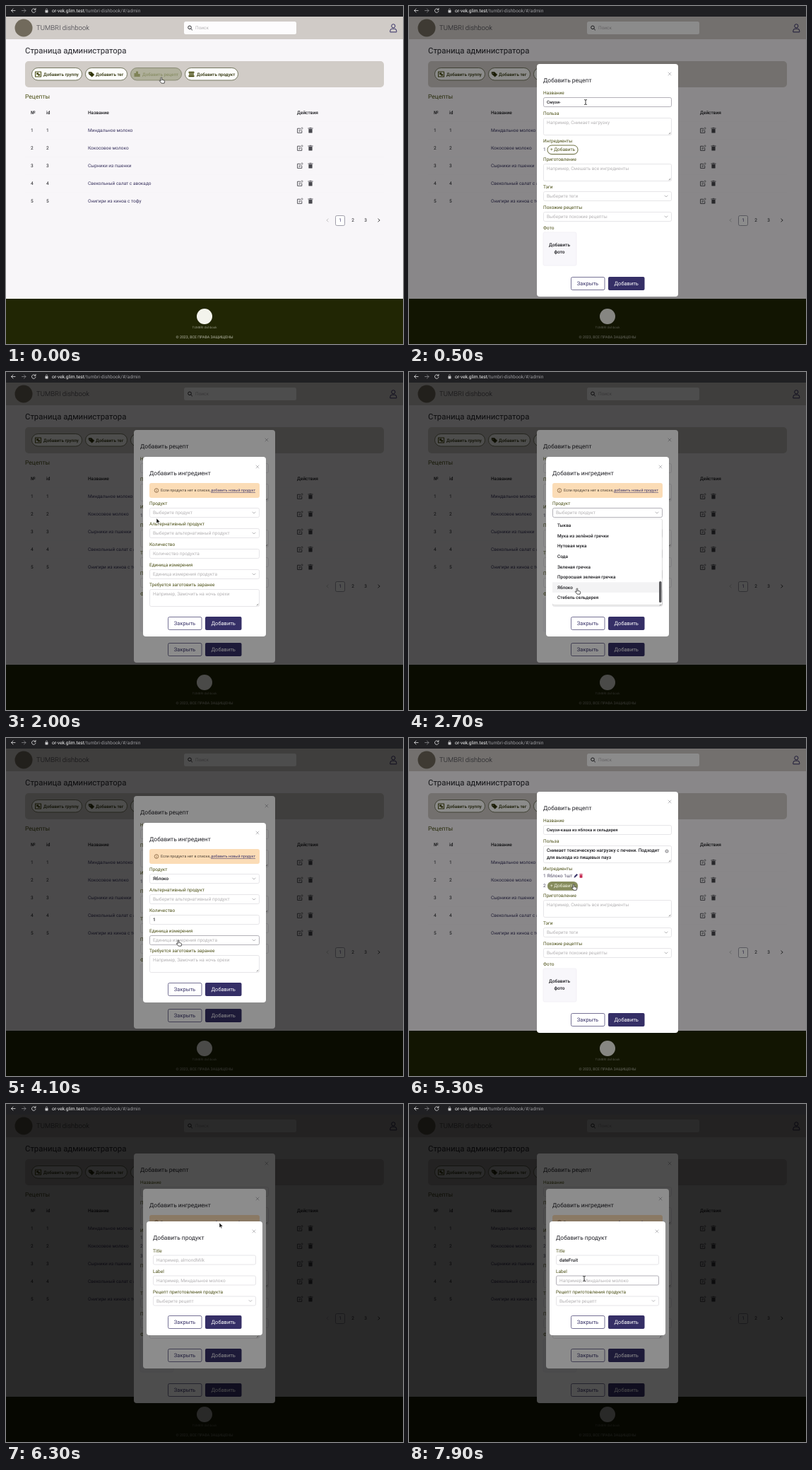
An HTML page for the animation above (8000 ms loop, 562 by 478 pixels).

```html
<!DOCTYPE html>
<html lang="ru">
<head>
<meta charset="utf-8">
<title>Страница администратора</title>
<style>
html, body { margin: 0; width: 100%; height: 100%; overflow: hidden; background: #f8f6f9; }
svg { display: block; }
#stage { width: 100vw; height: 100vh; font-family: Roboto, sans-serif; text-rendering: geometricPrecision; }
</style>
</head>
<body>
<svg id="stage" viewBox="0 0 562 478"></svg>
<script>
const LOOP = 8000, STEP = 100;
const OLIVE = '#4a4e14', NAVY = '#352f66', INK = '#1c1c20', HINT = '#b4b2b4', ICON = '#48484e';
const stage = document.getElementById('stage');

// Drawing helpers; text is placed by its vertical middle.
const text = (x, y, str, { size = 6.5, fill = INK, weight = 400, anchor = 'start', extra = '' } = {}) =>
  `<text x="${x}" y="${y + size * .35}" font-size="${size}" fill="${fill}" font-weight="${weight}" text-anchor="${anchor}" ${extra}>${str}</text>`;
const rect = (x, y, w, h, fill, r = 0, stroke = 'none') =>
  `<rect x="${x}" y="${y}" width="${w}" height="${h}" rx="${r}" fill="${fill}" stroke="${stroke}" stroke-width=".8"/>`;
const line = (d, stroke, width = .8, fill = 'none') =>
  `<path d="${d}" fill="${fill}" stroke="${stroke}" stroke-width="${width}" stroke-linecap="round" stroke-linejoin="round"/>`;
const circle = (x, y, r, fill, stroke = 'none') =>
  `<circle cx="${x}" cy="${y}" r="${r}" fill="${fill}" stroke="${stroke}"/>`;
const chevron = (x, y, dx, dy, color) => dx
  ? line(`M${x - dx} ${y - 2}L${x + dx} ${y}L${x - dx} ${y + 2}`, color)
  : line(`M${x - 2} ${y - dy}L${x} ${y + dy}L${x + 2} ${y - dy}`, color);

const trash = (x, y, color, k = 1) => `<g transform="translate(${x} ${y}) scale(${k})">` +
  rect(-2.6, -2, 5.2, 5.6, color, .6) + line('M-3.2-3h6.4M-1-3.7h2', color, .9) + '</g>';
const edit = (x, y) => line(`M${x} ${y - 2.8}h-3.4v6.2h6.2v-3`, ICON, .9) +
  line(`M${x - 1} ${y + 1}l.4-1.7 3.6-3.6 1.3 1.3-3.6 3.6z`, ICON, .7);

// Timing helpers.
const clamp = v => Math.max(0, Math.min(1, v));
const during = (t, a, b) => t >= a && t < b;
const ramp = (t, a, b) => clamp((t - a) / (b - a));
const typed = (str, t, a, b) => str.slice(0, Math.round(ramp(t, a, b) * str.length));
const show = (t, a, b) => !during(t, a, b) ? 0 : t < a + STEP ? .5 : 1;

function browserBar() {
  return rect(0, 0, 562, 15, '#202023') +
    line('M13 6.5H7.5M10 4L7.5 6.5L10 9', '#e2e2e4') +
    line('M22.5 6.5H28M25.5 4L28 6.5L25.5 9', '#88888c') +
    line('M41.6 5a2.8 2.8 0 1 0 .4 2.2M42 3.3v2h-2', '#e2e2e4') +
    rect(55.5, 6, 4, 3.4, '#c8c8ca', .4) + line('M56.4 6V5a1.1 1.1 0 0 1 2.2 0V6', '#c8c8ca', .6) +
    text(65, 6.5, 'or-vek.glim.test<tspan fill="#98989c">/tumbri-dishbook/#/admin</tspan>', { fill: '#f2f2f2', size: 6.7 });
}

const buttonIcons = [
  x => line(`M${x} 93h8v7h-8z`, OLIVE, 1.1) + rect(x + 1.6, 94.4, 3, 2.6, OLIVE) + rect(x + 3.8, 96.2, 2.8, 2.4, OLIVE),
  x => line(`M${x} 93.5h3.4l3.8 3.6-3 3-4.2-3.8z`, '#2c3006', .8, '#2c3006') + circle(x + 1.6, 95, .6, '#fff'),
  x => rect(x, 95, 3, 5, '#7f8357') + rect(x + 2.5, 92.5, 3, 7.5, '#7f8357') + rect(x + 5.2, 96, 3, 4, '#7f8357'),
  x => rect(x, 92.8, 8, 2, OLIVE, .6) + rect(x + .6, 95.4, 6.8, 2, OLIVE) + rect(x, 98, 8, 2.2, OLIVE, .6)
];

function toolButton(i, x, w, label, hover) {
  const color = hover ? '#8b9068' : '#2c3006';
  return rect(x + .5, 87.5, w, 17.5, hover ? '#b0b09c' : '#fdfdfb', 8.7, hover ? '#7c7e66' : '#5a5e42') +
    buttonIcons[i](x + 5.5) + text(x + (i === 1 ? 15 : 17), 96.5, label, { fill: color, weight: 500, size: 6.25 });
}

const dishes = ['Миндальное молоко', 'Кокосовое молоко', 'Сырники из пшенки', 'Свекольный салат с авокадо', 'Онигири из киноа с тофу'];

function page(t) {
  const bold = { weight: 500 };
  let s = rect(0, 14, 562, 464, '#f8f6f9') + rect(0, 14, 562, 33, '#d0cbc7') +
    circle(25, 31, 12.5, '#716a5c') +
    text(43, 31, 'TUMBRI dishbook', { size: 9.5, weight: 300, fill: '#34343c' }) +
    rect(252, 22, 159, 18, '#fdfcfd', 2.5) + circle(260, 30.3, 2.3, 'none', '#2c2c30') +
    line('M261.8 32.2l1.8 1.8', '#2c2c30', 1) + text(268, 31, 'Поиск', { fill: HINT }) +
    circle(548.3, 28.3, 2.6, 'none', NAVY) + line('M543.8 36.5v-1.3a3 3 0 0 1 3-3h3a3 3 0 0 1 3 3v1.3z', NAVY, 1) +
    text(27, 62.7, 'Страница администратора', { size: 11.35, fill: '#222228' }) +
    rect(27, 78, 508, 37, '#d1ccc7', 5) +
    toolButton(0, 36, 71, 'Добавить группу') + toolButton(1, 112, 59, 'Добавить тег') +
    toolButton(2, 176, 72, 'Добавить рецепт', t < 200) + toolButton(3, 253, 75, 'Добавить продукт') +
    text(27, 128.5, 'Рецепты', { size: 8.55, fill: OLIVE }) +
    text(35, 151, '№', bold) + text(57, 151, 'id', bold) +
    text(116, 151, 'Название', bold) + text(412, 151, 'Действия', bold);
  dishes.forEach((name, i) => {
    const y = 176 + i * 25;
    s += rect(27, y - 13, 508, .5, '#f2f0f4') + text(35, y, i + 1) + text(57, y, i + 1) +
      text(116, y, name, { fill: '#3b3560' }) + edit(416, y) + trash(431, y, ICON);
  });
  s += chevron(455, 303, -1.2, 0, '#bbb') + rect(466.5, 296.5, 13, 14, '#fff', 2, '#8a8896');
  [473, 491, 509].forEach((x, i) => s += text(x, 303, i + 1, { anchor: 'middle', fill: i ? INK : NAVY }));
  return s + chevron(528, 303, 1.2, 0, '#222') +
    rect(0, 414, 562, 64, '#212604') + circle(281, 439, 11, '#f3f3ec') +
    text(281, 454.5, 'TUMBRI dishbook', { size: 4.4, fill: '#8d907b', anchor: 'middle' }) +
    text(281, 468.5, '© 2023, ВСЕ ПРАВА ЗАЩИЩЕНЫ', { size: 5.3, fill: '#b5b6a6', anchor: 'middle' });
}

// Form parts.
function modal(x, y, w, h, title, body) {
  const cx = x + w - 12, cy = y + 14;
  return rect(x, y, w, h, '#fff', 4) + line(`M${cx - 2} ${cy - 2}l4 4m0-4l-4 4`, '#a2a2a6', .7) +
    text(x + 9, y + 23, title, { size: 8.45, fill: '#222228' }) + body +
    rect(229.5, y + h - 27.5, 47.5, 18, '#fff', 2, '#55507c') +
    text(253, y + h - 18.5, 'Закрыть', { size: 7.5, fill: NAVY, anchor: 'middle' }) +
    rect(282, y + h - 28, 51.5, 19, NAVY, 2) +
    text(307.7, y + h - 18.5, 'Добавить', { size: 7.5, fill: '#fff', anchor: 'middle' });
}

function field(x, y, w, label, value, hint, { h = 14, focus, select, size = 6.5 } = {}) {
  const style = value ? { weight: 500, size } : { fill: HINT };
  let s = text(x, y - 6, label, { fill: OLIVE }) +
    rect(x + .5, y + .5, w - 1, h - 1, '#fff', 2, focus ? '#a09ea6' : '#e0dfe3');
  (value || hint).split('\n').forEach((row, i) => s += text(x + 5, y + 7 + i * 10, row, style));
  if (select) s += chevron(x + w - 8, y + 7, 0, 1, '#a5a5a8');
  if (h > 14) s += line(`M${x + w - 4} ${y + h - 2}l2-2m-.6 2l.6-.6`, '#666', .6);
  return s;
}

function dropdown(y, items, h, scroll, hover) {
  const pitch = 14.6, hidden = Math.max(0, items.length - 8);
  let s = rect(203, y - .5, 156, h + 2, '#0002', 3) +
    `<svg x="203" y="${y}" width="155" height="${h}">` + rect(0, 0, 155, h, '#fff', 2);
  items.forEach((name, i) => {
    const cy = 9 + (i - hidden * scroll) * pitch;
    if (i === hover) s += rect(0, cy - 7.3, 155, pitch, '#f3f3f4');
    s += text(7, cy, name, { weight: 500, size: 6.4 });
  });
  if (hidden) s += rect(151, 2 + scroll * 86, 3.5, 30, '#58585b', 1.5);
  return s + '</svg>';
}

function recipeForm(t) {
  const rows = t >= 5700 ? 2 : t >= 4800 ? 1 : 0;
  const top = 82 - rows * 6, low = top + rows * 12, rowY = low + 121;
  const hover = during(t, 1700, 2000) || during(t, 5200, 5500) || during(t, 5800, 6000);
  const name = typed('Смузи-каша из яблока и сельдерея', t, 400, 900);
  const benefit = typed('Снимает токсическую нагрузку с печени. Подходит\nдля выхода из пищевых пауз', t, 1000, 1500);
  let s = field(190, top + 47, 182, 'Название', name, 'Например, Миндальное молоко', { size: 6, focus: during(t, 400, 1000) }) +
    field(190, top + 76, 182, 'Польза', benefit, 'Например, Снимает нагрузку', { h: 25, size: 6.55, focus: during(t, 1000, 2000) });
  if (benefit) s += circle(365, top + 84, 2.6, '#a5a5a8') + line(`M364 ${top + 83}l2 2m0-2l-2 2`, '#fff', .6);
  s += text(190, top + 109, 'Ингредиенты', { fill: OLIVE });
  ['Яблоко 1шт', 'Стебель сельдерея 1шт'].slice(0, rows).forEach((item, i) => {
    const y = top + 119 + i * 12, x = 236 + i * 38;
    s += text(190, y, `${i + 1} ${item}`, { fill: '#4a4560' }) +
      line(`M${x - 2} ${y + 2}l.5-1.7 3-3 1.2 1.2-3 3z`, NAVY, .6, NAVY) + trash(x + 7.5, y, '#c52b52', .75);
  });
  s += text(190, rowY, rows + 1, { fill: '#4a4560' }) +
    rect(196, rowY - 5.5, 43.5, 13, '#0002', 6) +
    rect(196, rowY - 6, 43, 12.5, hover ? '#868c5d' : '#fff', 6, hover ? 'none' : OLIVE) +
    text(217.5, rowY, '+ Добавить', { fill: hover ? '#f4f5e6' : OLIVE, anchor: 'middle' }) +
    field(190, low + 141, 182, 'Приготовление', '', 'Например, Смешать все ингредиенты', { h: 25 }) +
    field(190, low + 180, 182, 'Тэги', '', 'Выберите теги', { select: true }) +
    field(190, low + 209, 182, 'Похожие рецепты', '', 'Выберите похожие рецепты', { select: true }) +
    text(190, low + 232, 'Фото', { fill: OLIVE }) + rect(190, low + 238, 47, 47, '#f8f7fb', 2, '#f0eef4') +
    text(213, low + 256, 'Добавить', { anchor: 'middle', weight: 500 }) +
    text(213, low + 266, 'фото', { anchor: 'middle', weight: 500 });
  return modal(181, top, 200, 329 + rows * 12, 'Добавить рецепт', s);
}

const products = ['Миндаль', 'Вода', 'Финики', 'Кокос', 'Пшено', 'Свекла', 'Авокадо', 'Киноа', 'Тофу', 'Нори', 'Рис', 'Банан',
  'Лимон', 'Соль', 'Мёд', 'Корица', 'Тыква', 'Мука из зелёной гречки', 'Нутовая мука', 'Сода', 'Зеленая гречка',
  'Проросшая зеленая гречка', 'Яблоко', 'Стебель сельдерея'];
const units = ['шт', 'г', 'кг', 'мл', 'л', 'ст. л.', 'ч. л.', 'стакан'];

function ingredientForm(t) {
  const second = during(t, 5500, 5700), first = during(t, 2800, 4800);
  const listOpen = during(t, 2200, 2800), unitsOpen = during(t, 4200, 4500);
  let s = rect(203, 157, 156, 21, '#fbdcb6', 3) + circle(213, 167.5, 2.8, 'none', '#9c7a55') +
    line('M213 166v.1M213 167.4v1.8', '#9c7a55', .8) +
    text(219, 167.5, 'Если продукта нет в списке,', { size: 5.35, fill: '#4d4236' }) +
    text(290, 167.5, 'добавить новый продукт', { size: 5.35, fill: NAVY, extra: 'text-decoration="underline"' }) +
    field(203, 192, 156, 'Продукт', first ? 'Яблоко' : second ? 'Стебель сельдерея' : '', 'Выберите продукт', { select: true, focus: listOpen }) +
    field(203, 221, 156, 'Альтернативный продукт', '', 'Выберите альтернативный продукт', { select: true }) +
    field(203, 250, 156, 'Количество', during(t, 3700, 4800) || second ? '1' : '', 'Количество продукта', { focus: during(t, 3500, 4000) }) +
    field(203, 279, 156, 'Единица измерения', during(t, 4500, 4800) || second ? 'шт' : '', 'Единица измерения продукта', { select: true, focus: during(t, 4000, 4600) }) +
    field(203, 307, 156, 'Требуется заготовить заранее', '', 'Например, Замочить на ночь орехи', { h: 25 });
  s = modal(194, 120, 174, 254, 'Добавить ингредиент', s);
  if (listOpen) {
    const scroll = ramp(t, 2200, 2600);
    s += dropdown(208, products, 121, scroll, scroll === 1 ? 22 : -1);
  }
  if (unitsOpen) s += dropdown(295, units, 121, 0, 0);
  return s;
}

function productForm(t) {
  return modal(199, 166, 164, 161, 'Добавить продукт',
    field(208, 213.5, 146, 'Title', typed('dateFruit', t, 6900, 7500), 'Например, almondMilk', { focus: during(t, 6800, 7700) }) +
    field(208, 242.5, 146, 'Label', '', 'Например, Миндальное молоко', { focus: t >= 7700 }) +
    field(208, 271.5, 146, 'Рецепт приготовления продукта', '', 'Выберите рецепт', { select: true }));
}

// Each dialog dims whatever lies below the browser bar.
const layer = (k, draw) => k ? rect(0, 14, 562, 464, `rgba(0,0,0,${.45 * k})`) + `<g opacity="${k}">${draw()}</g>` : '';

const pointers = {
  hand: line('M-1 .8c0-1.2 1.8-1.2 1.8 0v2.6l2.9.7c.8.2 1 .8.9 1.5l-.5 2.6H.2L-2.6 5c-.4-.9.6-1.2 1.1-.7l.5.4z', '#111', .7, '#fff'),
  arrow: line('M0 0v7l1.6-1.5 1.1 2.4 1.1-.5-1.1-2.3H5z', '#fff', .5, '#111'),
  beam: line('M-1.5-3.5q1.5 0 1.5.8q0-.8 1.5-.8M0-2.7v5.4M-1.5 3.5q1.5 0 1.5-.8q0 .8 1.5.8', '#111', .8)
};
const route = [
  [0, 220, 101, 'hand'], [200, 220, 101, 'arrow'], [400, 250, 136, 'beam'], [900, 250, 136, 'beam'],
  [1000, 270, 168, 'beam'], [1500, 270, 168, 'arrow'], [1700, 213, 207, 'hand'], [2000, 213, 207, 'arrow'],
  [2200, 250, 199, 'hand'], [2400, 238, 306, 'hand'], [2900, 238, 306, 'hand'], [3500, 245, 257, 'beam'],
  [3900, 245, 257, 'beam'], [4000, 244, 286, 'hand'], [4200, 244, 286, 'hand'], [4400, 222, 302, 'hand'],
  [4500, 222, 302, 'hand'], [4600, 307, 354, 'hand'], [4800, 307, 354, 'arrow'], [5200, 233, 207, 'hand'],
  [5400, 233, 207, 'hand'], [5500, 307, 354, 'hand'], [5700, 307, 354, 'arrow'], [5800, 233, 213, 'hand'],
  [5900, 233, 213, 'arrow'], [6100, 302, 168, 'arrow'], [6500, 302, 168, 'arrow'], [6800, 250, 220, 'beam'],
  [7400, 250, 220, 'beam'], [7700, 248, 247, 'beam'], [LOOP, 248, 247, 'beam']
];

function pointer(t) {
  const i = route.findIndex(p => p[0] > t) - 1;
  const [a, x, y, shape] = route[i], [b, x2, y2] = route[i + 1];
  const u = ramp(t, a, b), k = u * u * (3 - 2 * u);
  return `<g transform="translate(${x + (x2 - x) * k} ${y + (y2 - y) * k})">${pointers[shape]}</g>`;
}

function scene(t) {
  const ingredient = show(t, 1900, 4800) || show(t, 5400, 5700) || show(t, 5900, LOOP);
  return page(t) + layer(show(t, 100, LOOP), () => recipeForm(t)) +
    layer(ingredient, () => ingredientForm(t)) +
    layer(show(t, 6100, LOOP), () => productForm(t)) + browserBar() + pointer(t);
}

let last = -1;
function tick() {
  const t = Math.floor(performance.now() % LOOP / STEP) * STEP;
  if (t !== last) stage.innerHTML = scene(last = t);
  requestAnimationFrame(tick);
}
tick();
</script>
</body>
</html>
```
